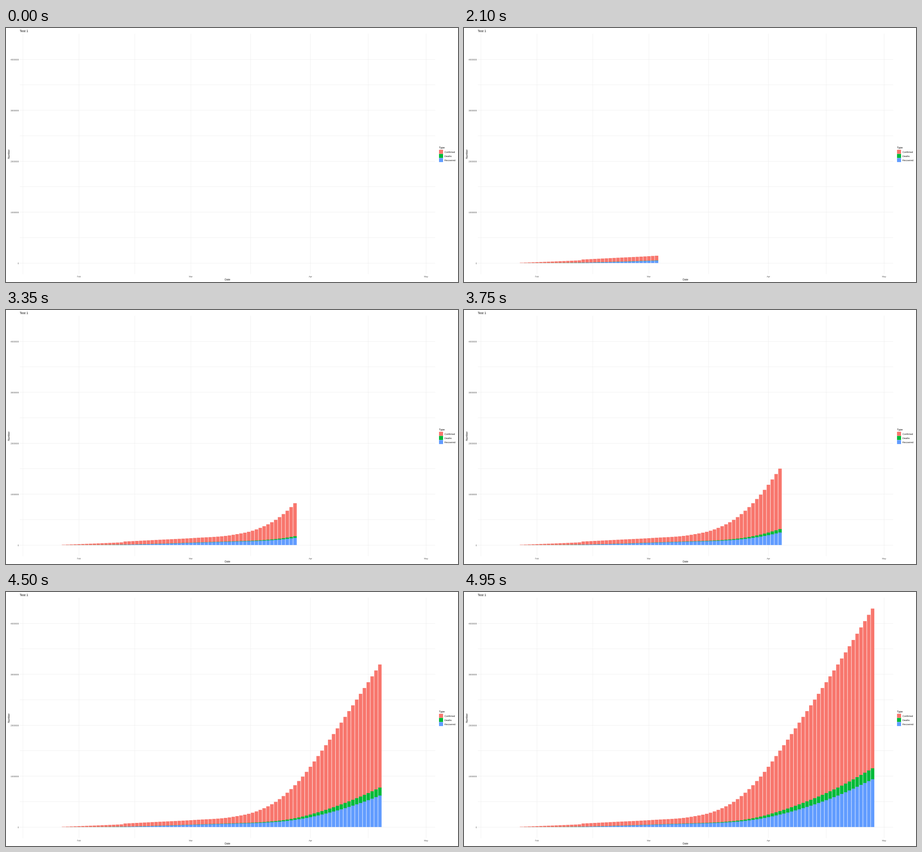
Recreate the animation shown at these times as a matplotlib script. Size 998 px wide and 561 px high, loop 5 s.

```python
import numpy as np
import matplotlib.pyplot as plt
from matplotlib.animation import FuncAnimation
from matplotlib.patches import PathPatch, Rectangle
from matplotlib.textpath import TextPath
from matplotlib.transforms import Affine2D

plt.rcParams["font.family"] = "Liberation Sans"

W, H, DPI = 998, 561, 64
FRAMES, INTERVAL = 100, 50

# Panel geometry in pixels; days are counted from 28 January
LEFT, RIGHT, TOP, BOTTOM = 30.5, 947.7, 12.7, 543.4
DAY = 8.517
X0, Y0 = 127.08, 519.1
UNIT = 0.1125                       # pixels per thousand cases
DAYS = np.arange(92)
HIDDEN_DAYS = 6                     # first days, too low to be seen

RED, GREEN, BLUE = "#F8766D", "#00BA38", "#619CFF"
GREY, PALE = "#4D4D4D", "#EBEBEB"


def curve(*points):
    """Smooth daily values (cubic Hermite) through (day, thousands) points."""
    xs, ys = np.array(points, float).T
    slopes = np.gradient(ys, xs)
    k = np.clip(np.searchsorted(xs, DAYS, side="right") - 1, 0, len(xs) - 2)
    step = xs[k + 1] - xs[k]
    t = (DAYS - xs[k]) / step
    ease = t * t * (3 - 2 * t)
    bend = slopes[k] * (1 - t) - slopes[k + 1] * t
    return ys[k] + (ys[k + 1] - ys[k]) * ease + step * t * (1 - t) * bend


total = curve((0, 6), (8, 29), (15, 52), (24, 86), (34, 125), (44, 187),
              (50, 293), (56, 534), (62, 976), (67, 1486), (75, 2375),
              (83, 3295), (91, 4275))
total += 14 * (DAYS >= 16)          # sudden rise on 13 February
recovered = curve((0, 0.1), (15, 5), (25, 23), (35, 48), (45, 70), (52, 87),
                  (58, 122), (62, 165), (67, 246), (75, 420), (83, 650),
                  (91, 938))
deaths = curve((0, 0.1), (20, 1.9), (40, 4), (50, 8.7), (58, 24), (67, 67),
               (75, 115), (83, 163), (91, 215))

fig = plt.figure(figsize=(W / DPI, H / DPI), dpi=DPI, facecolor="white")
ax = fig.add_axes([0, 0, 1, 1])
ax.axis("off")


def label(x, y, text, size, color="black", align=0, turn=0):
    """Text on the baseline y; align 0, 0.5 or 1 puts left, centre, right at x."""
    path = TextPath((0, 0), text, size=size)
    box = path.get_extents()
    place = Affine2D().translate(-box.x0 - align * box.width, 0)
    place.scale(1, -1).rotate_deg(-turn).translate(x, y)
    ax.add_patch(PathPatch(place.transform_path(path), fc=color, lw=0,
                           snap=False))


def grid_line(xs, ys):
    ax.plot(xs, ys, color=PALE, lw=0.65 * 72 / DPI, snap=False, zorder=0.5,
            solid_capstyle="butt")


def draw_grid():
    for k in range(9):
        y = Y0 + 0.2 - 500 * k * UNIT
        grid_line([LEFT, RIGHT], [y, y])
        if k % 2 == 0:
            label(28.2, y + 2.2, str(500000 * k), 4.7, GREY, align=1)

    months = {"Feb": 4, "Mar": 33, "Apr": 64, "May": 94}
    starts = list(months.values())
    middles = [(a + b) / 2 for a, b in zip(starts, starts[1:])]
    for day in starts + middles + [-10.5]:
        x = X0 + day * DAY
        grid_line([x, x], [TOP, BOTTOM])
    for name, day in months.items():
        label(X0 + day * DAY, 550.6, name, 4.7, GREY, align=0.5)


def draw_legend():
    label(956.2, 266.1, "Type", 5.8)
    rows = [("Confirmed", RED), ("Deaths", GREEN), ("Recovered", BLUE)]
    for k, (name, color) in enumerate(rows):
        y = 269 + 9.15 * k
        ax.add_patch(Rectangle((956.1, y), 8.9, 8.8, fc=color, lw=0,
                               snap=False))
        label(968.5, y + 6.8, name, 5)


def draw_bars(low, high, color, zorder):
    # Tuck each part one pixel under the part below, so no seam shows
    base = np.maximum(low * UNIT - 1, 0)
    return ax.bar(X0 + DAYS * DAY, base - high * UNIT, 0.9 * DAY, Y0 - base,
                  color=color, lw=0, snap=False, zorder=zorder)


draw_grid()
draw_legend()
label(30.4, 9, "Test 1", 7)
label(489.2, 557.5, "Date", 5.8, align=0.5)
label(8, 278.5, "Number", 5.8, align=0.5, turn=90)

lower = recovered + deaths
stacks = list(zip(draw_bars(lower, total, RED, 2),
                  draw_bars(recovered, lower, GREEN, 3),
                  draw_bars(0 * recovered, recovered, BLUE, 4)))
ax.set_xlim(0, W)
ax.set_ylim(H, 0)


def update(frame):
    last = len(DAYS) + HIDDEN_DAYS - 1
    day = round(frame * last / (FRAMES - 1)) - HIDDEN_DAYS
    for i, parts in enumerate(stacks):
        for part in parts:
            part.set_visible(i <= day)
    return []


anim = FuncAnimation(fig, update, frames=FRAMES, interval=INTERVAL,
                     repeat=True, repeat_delay=0)
plt.show()
```
